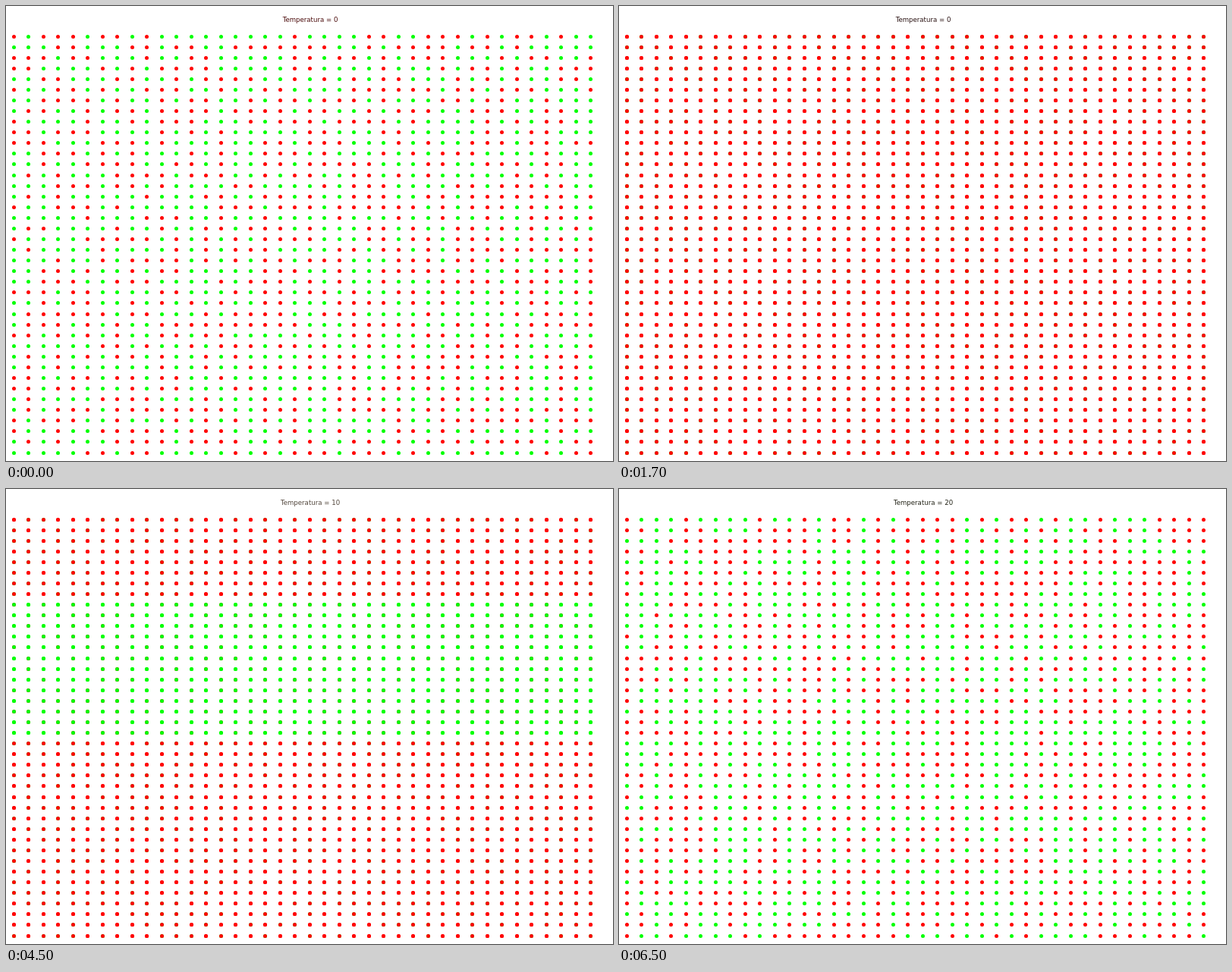
Recreate the animation shown at these times as an HTML page with a canvas. Size 800 by 600 pixels, loop 8 s.

```html
<!DOCTYPE html>
<html lang="es">
<head>
<meta charset="utf-8">
<title>Temperatura</title>
<style>
  html, body { margin: 0; width: 100%; height: 100%; overflow: hidden; background: #fff; }
  canvas { display: block; }
  #title {
    position: absolute; left: 0; top: 0; width: 802px;
    font: 8.6px/36px "DejaVu Sans", sans-serif; text-align: center;
  }
</style>
</head>
<body>
<canvas id="grid" width="800" height="600"></canvas>
<div id="title"></div>
<script>
const SIZE = 40, LOOP = 8000, HOLD = 2000, OFFSET = 1500;
const RED = '#f00', GREEN = '#0f0';
const INK = ['#480808', '#281010', '#4c4834', '#50443a', '#202014'];
const ctx = document.getElementById('grid').getContext('2d');
const title = document.getElementById('title');

function randomSpins(seed) {
  const rand = () => {
    seed = (seed + 0x6d2b79f5) | 0;
    let h = Math.imul(seed ^ (seed >>> 15), seed | 1);
    h ^= h + Math.imul(h ^ (h >>> 7), h | 61);
    return ((h ^ (h >>> 14)) >>> 0) / 4294967296;
  };
  return Array.from({ length: SIZE * SIZE }, () => rand() < 0.5);
}

function drawSpins(isUp) {
  for (let row = 0; row < SIZE; row++) {
    for (let col = 0; col < SIZE; col++) {
      const x = Math.round(10 + col * 760 / 39) + 0.5;
      const y = Math.floor(40 + row * 549 / 39) + 0.5;
      ctx.fillStyle = isUp(row, col) ? GREEN : RED;
      ctx.beginPath();
      ctx.arc(x, y, 2.5, 0, 2 * Math.PI);
      ctx.fill();
    }
  }
}

// Each temperature starts disordered, then its settled state is painted on top.
function drawStep(step) {
  const run = Math.floor(step / 2);
  const spins = randomSpins(run + 1);
  ctx.clearRect(0, 0, 800, 600);
  drawSpins((row, col) => spins[row * SIZE + col]);
  if (step % 2) drawSpins(row => run === 1 && row >= 8 && row <= 20);
  title.textContent = `Temperatura = ${run * 10}`;
  title.style.color = INK[step];
}

let shown = -1;
function tick() {
  const step = Math.floor((performance.now() % LOOP + OFFSET) / HOLD);
  if (step !== shown) drawStep(shown = step);
  requestAnimationFrame(tick);
}
tick();
</script>
</body>
</html>
```
